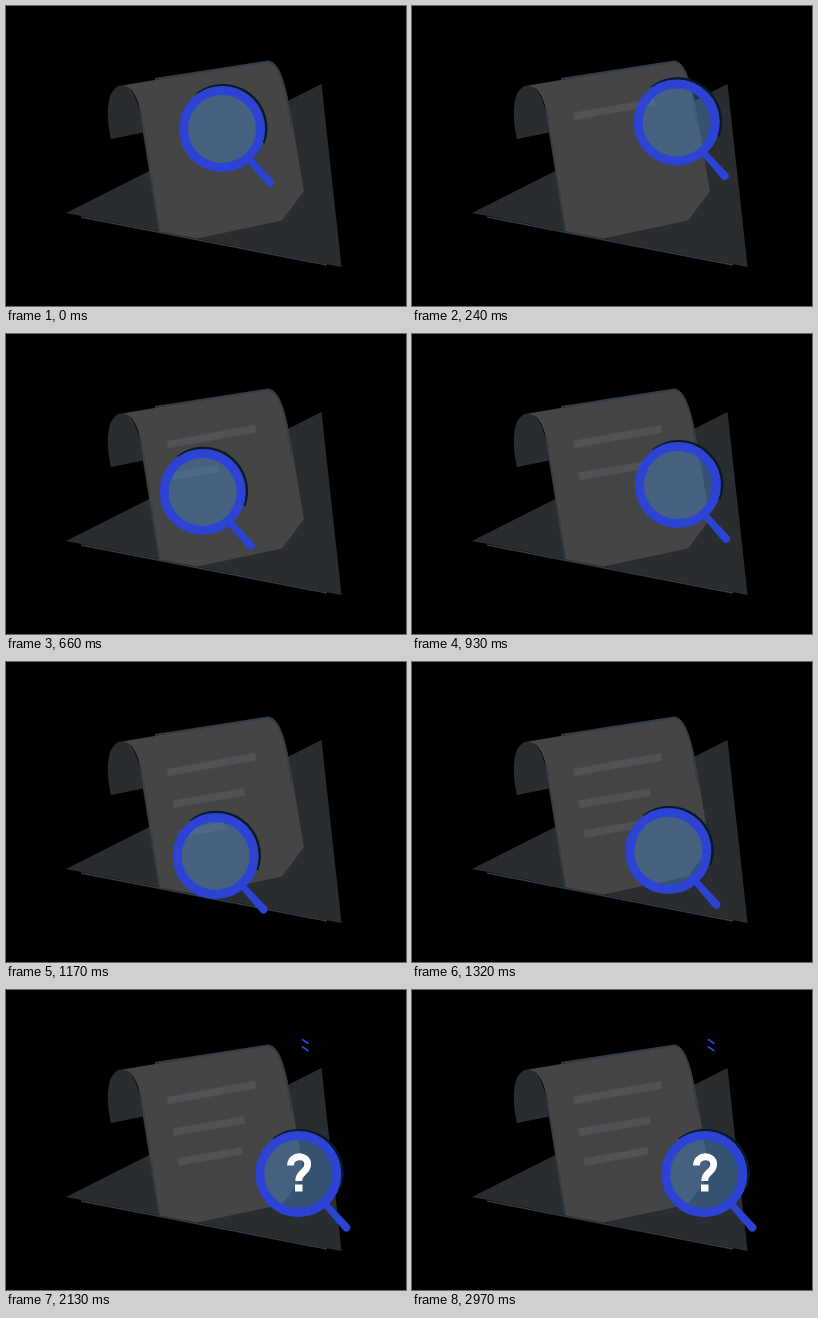
Animation of 400 by 300 pixels, one loop 3.03 s. Source, as an HTML page:

```html
<!DOCTYPE html>
<html lang="en">
<head>
<meta charset="utf-8">
<title>Searching a document</title>
<style>
html, body { margin: 0; width: 100%; height: 100%; overflow: hidden; background: #000; }
svg { display: block; width: 400px; height: 300px; fill: none; }
</style>
</head>
<body>
<svg viewBox="0 0 400 300">
  <path d="M60 207 315.500 78 335.500 261Z" fill="#2a2d30"/>
  <path d="M75 211 321 259" stroke="#343c45" stroke-width="1.500"/>

  <path d="M105 133C100 112 99 81 116 79.500 128 79 134 100 137 126.500Z" fill="#2a2d30"/>
  <path d="M116 79.500 262 55C272 56 279 74 284 103L298 185 276 214.500 191 232.500 153.500 225.500 136 115C133 96 129 81 116 79.500Z" fill="#454546"/>
  <path d="M149 73 262 55.500C272 56 279 74 285.500 120M134 102 153.500 225.500" stroke="#343c45" stroke-width="1.800"/>

  <g id="bars" stroke="#515156" stroke-width="7.500">
    <path pathLength="1" d="M161.500 110.500 249.500 94.700"/>
    <path pathLength="1" d="M167 142.200 238.500 130"/>
    <path pathLength="1" d="M172 172.200 236.500 160.500"/>
  </g>

  <g stroke="#2c43d4" stroke-width="1.800">
    <path id="dash1" pathLength="1" d="M296 49.300 302.500 53.700"/>
    <path id="dash2" pathLength="1" d="M296 56.500 302.500 61"/>
    <circle id="ring" cx="126.300" cy="163.300" r="3.400"/>
  </g>

  <g id="lens">
    <path d="M-25-35A43 43 0 0 1 41.500 14" stroke="#08182b" stroke-width="2.500"/>
    <circle r="35" fill="#4789d4" fill-opacity=".4"/>
    <path d="M25 33 30 28.500 51.200 51A4.100 4.100 0 0 1 45.500 56.800Z" fill="#2c43d4"/>
    <circle r="38.500" stroke="#2c43d4" stroke-width="9"/>
  </g>

  <g id="mark">
    <path d="M284.500 175.500C284.500 164 302 164 301.700 174.500 301.500 183 292.700 181.500 292.700 191" stroke="#fff" stroke-width="6.800"/>
    <path id="dot" d="M289 194.500h7.500v7h-7.500z" fill="#fff"/>
  </g>
</svg>
<script>
const LOOP = 3030;
const $ = id => document.getElementById(id);
const bars = [...$('bars').children];

// Lens centre: time, x, y
const route = [
  [0, 216, 123], [240, 264.5, 116.5], [340, 282, 113], [540, 207, 145],
  [600, 187, 157], [660, 196.3, 158], [850, 280, 144], [1080, 208, 175],
  [1120, 200, 189], [1170, 209.3, 194], [1500, 292.3, 184]
];

const ramp = (t, from, to) => {
  const u = Math.min(1, Math.max(0, (t - from) / (to - from)));
  return u * u * (3 - 2 * u);
};

function slope(i, axis) {
  const a = route[i - 1], b = route[i + 1];
  return a && b ? (b[axis] - a[axis]) / (b[0] - a[0]) : 0;
}

// Cubic Hermite curve through the route, at rest at both ends
function along(t, axis) {
  const i = route.findIndex(p => p[0] > t);
  if (i < 0) return route[route.length - 1][axis];
  const a = route[i - 1], b = route[i];
  const span = b[0] - a[0], u = (t - a[0]) / span, v = 1 - u;
  return a[axis] * v * v * (1 + 2 * u) + b[axis] * u * u * (3 - 2 * u)
    + span * u * v * (slope(i - 1, axis) * v - slope(i, axis) * u);
}

function reveal(path, amount) {
  path.style.visibility = amount > 0 ? 'visible' : 'hidden';
  path.setAttribute('stroke-dasharray', amount < 1 ? `${amount} 2` : 'none');
}

function draw(t) {
  bars.forEach((bar, i) => reveal(bar, ramp(t, i * 490, i * 490 + 290)));
  $('lens').setAttribute('transform', `translate(${along(t, 1)} ${along(t, 2)})`);

  reveal($('dash1'), ramp(t, 1470, 1610));
  reveal($('dash2'), ramp(t, 1640, 1780));
  $('ring').style.opacity = 0.75 * ramp(t, 1400, 1590) * (1 - ramp(t, 1650, 2200));

  const pop = ramp(t, 1490, 1770);
  $('mark').style.opacity = pop;
  $('dot').style.opacity = ramp(t, 1620, 1800);
  $('mark').setAttribute('transform',
    `translate(293 178) rotate(${20 * (1 - pop)}) scale(${0.75 + 0.25 * pop}) translate(-293 -178)`);
}

const start = performance.now();
function tick() {
  draw((performance.now() - start) % LOOP);
  requestAnimationFrame(tick);
}
tick();
</script>
</body>
</html>
```
